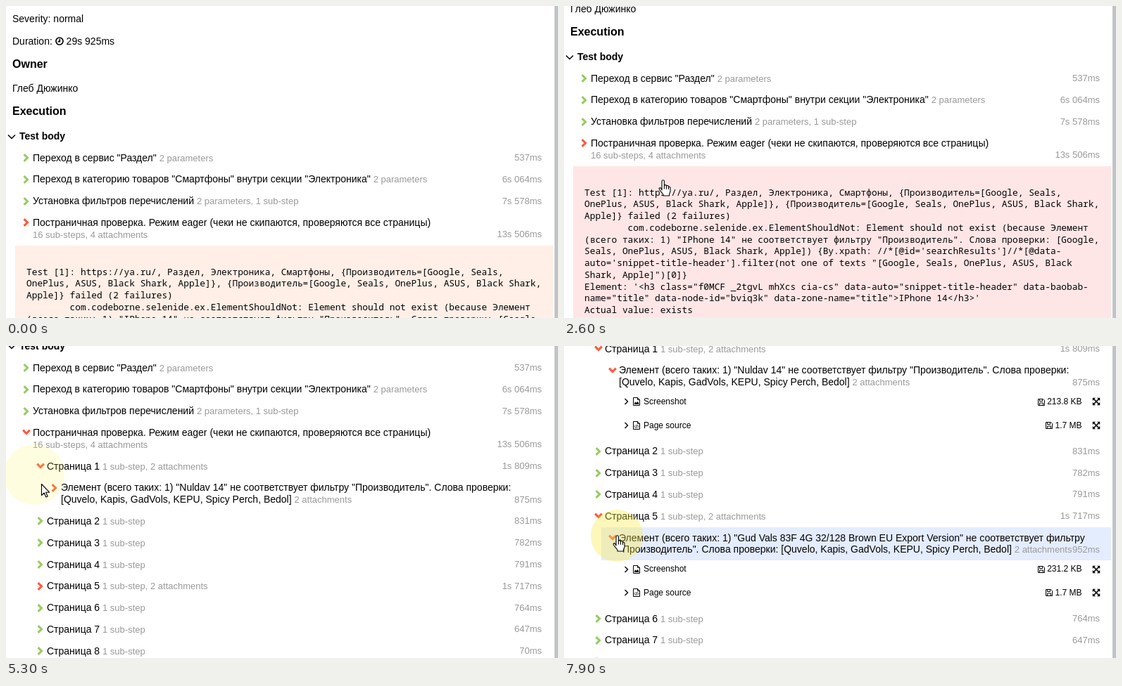
Recreate the animation shown at these times as an HTML page. Size 784 by 444 pixels, loop 8 s.

```html
<!DOCTYPE html>
<html lang="ru">
<head>
<meta charset="utf-8">
<title>Test report</title>
<style>
html, body { margin: 0; width: 100%; height: 100%; overflow: hidden; background: #fff; }
#stage { position: relative; width: 784px; height: 444px; overflow: hidden; background: #fff;
  font: 14px/16.8px "Liberation Sans", Arial, sans-serif; color: #000; white-space: pre; }
#page { position: absolute; left: 0; top: 0; width: 777px; }
#bar { position: absolute; left: 779px; top: 0; width: 5px; height: 100%; background: #c1c4c7; }
#page > p { position: absolute; left: 9px; margin: 0; }
#page > .head { font-size: 16px; font-weight: bold; }
#page > .body { left: 19px; font-weight: bold; }
#steps { position: absolute; left: 0; top: 200.6px; width: 777px; }
svg { overflow: visible; fill: none; stroke: #000; }
.row { position: relative; padding: 7px 0 7px 25px; }
.row.hover { background: #e4edfe; }
.row small { font-size: 13px; line-height: 1; color: #999; }
.row .time { position: absolute; right: 16px; bottom: 6.5px; line-height: 16.8px; }
.row svg { position: absolute; left: 10px; top: 9.4px; width: 12px; height: 12px; stroke: #97cc64; stroke-width: 3.1; }
.row.failed svg { stroke: #fd5a3e; }
.row.open svg { transform: rotate(90deg); }
.file { position: relative; height: 33.7px; font-size: 12px; }
.file > * { position: absolute; top: 4.1px; }
.file svg { top: 6.5px; width: 12px; height: 12px; }
.file .size { right: 41.5px; }
.file .size svg { position: absolute; left: -14px; top: 2.5px; }
#log { margin: 0 0 0 13px; padding: 29px 16px; font: 12.83px/16.75px "Noto Sans Mono", "DejaVu Sans Mono", monospace; }
#overlay { position: absolute; left: 0; top: 0; width: 784px; height: 444px; }
#overlay path { fill: #fff; stroke-width: 1.1; stroke-linejoin: round; }
</style>
</head>
<body>
<div id="stage">
  <div id="page">
    <p style="top:9.6px">Severity: normal</p>
    <p style="top:41.6px">Duration: <svg width="12" height="12" style="vertical-align:-1.5px" stroke-width="1.7"><circle cx="6" cy="6" r="5"/><path d="M6.3 2.8V6.6H3.6"/></svg> 29s 925ms</p>
    <p class="head" style="top:75px">Owner</p>
    <p style="top:108.6px">Глеб Дюжинко</p>
    <p class="head" style="top:142px">Execution</p>
    <p class="body" style="top:176.6px"><svg width="12" height="12" style="position:absolute;left:-17px;top:3px" stroke-width="1.5"><path d="M1 3.5 6 8.5 11 3.5"/></svg>Test body</p>
    <div id="steps"></div>
  </div>
  <div id="bar"></div>
  <svg id="overlay">
    <circle id="ripple" stroke="none"/>
    <g id="hand"><path d="M-1 14V1.5a1.7 1.7 0 0 1 3.4 0V8a1.5 1.5 0 0 1 3 .3v.5a1.5 1.5 0 0 1 3 .5v.6a1.4 1.4 0 0 1 2.6.8V15.5c0 2-1.5 3-1.5 5V22H1V20.5C0 18.5-3 16-4.7 12.8c-.8-1.6 1-2.8 2.2-1.6z"/><path d="M2.4 8v4.5M5.4 8.8v4M8.4 9.6v3.3"/></g>
    <path id="arrow" d="M.5.5V16.5L4.2 13l2.6 6 2.4-1-2.6-5.8h5z"/>
  </svg>
</div>
<script>
const $ = id => document.getElementById(id);
const brands = '[Quvelo, Kapis, GadVols, KEPU, Spicy Perch, Bedol]';

const icon = (body, style = '') => `<svg viewBox="0 0 12 12" style="${style}">${body}</svg>`;

const step = (level, title, info, time, failed, id = '') =>
  `<div class="row${failed ? ' failed' : ''}" id="${id}" style="margin-left:${level * 20 - 7}px">` +
  icon('<path d="M2.6 1.2 7.5 6 2.6 10.8"/>') +
  `${title}<small>${info}</small><small class="time">${time}</small></div>`;

const group = (id, content) => `<div id="${id}-kids" hidden>${content}</div>`;

const sheet = '<path d="M1.5.5H7.5L10.5 3.5V11.5H1.5zM7.5.5V3.5H10.5"/>';
const picture = sheet + '<path d="M3 10V8L4.5 6.5 6 8 7.5 6 9.2 8V10z" fill="#000" stroke="none"/>';
const source = sheet + '<path d="M4.6 5.5 3 7.5 4.6 9.5M7.4 5.5 9 7.5 7.4 9.5M6.5 5 5.5 10" stroke-width=".8"/>';
const floppy = '<path d="M1.5 1.5H8.5L10.5 3.5V10.5H1.5zM3.5 1.5V4.5H7.5V1.5M3.5 10.5V7H8.5V10.5"/>';
const expand = '<path d="M2 2 10 10M10 2 2 10" stroke-width="1.7"/><path d="M.8.8H5L.8 5zM11.2.8V5L7 .8zM.8 11.2V7L5 11.2zM11.2 11.2H7L11.2 7z" fill="#000" stroke="none"/>';

const file = (name, art, size) => '<div class="file">' +
  icon('<path d="M3.5 2 7.5 6 3.5 10" stroke-width="1.4"/>', 'left:83px') +
  icon(art, 'left:97px') + `<span style="left:113px">${name}</span>` +
  `<span class="size">${icon(floppy)}${size}</span>` + icon(expand, 'left:750px') + '</div>';

const files = size => file('Screenshot', picture, size) + file('Page source', source, '1.7 MB');

const pageStep = (n, time, id = '') =>
  step(2, `Страница ${n} `, id ? '1 sub-step, 2 attachments' : '1 sub-step', time, id, id);

const pages =
  pageStep(1, '1s 809ms', 'first') +
  group('first',
    step(3, `Элемент (всего таких: 1) "Nuldav 14" не соответствует фильтру "Производитель". Слова проверки:\n${brands} `,
      '2 attachments', '875ms', true, 'firstItem') + group('firstItem', files('213.8 KB'))) +
  pageStep(2, '831ms') + pageStep(3, '782ms') + pageStep(4, '791ms') +
  pageStep(5, '1s 717ms', 'fifth') +
  group('fifth',
    step(3, `Элемент (всего таких: 1) "Gud Vals 83F 4G 32/128 Brown EU Export Version" не соответствует фильтру\n"Производитель". Слова проверки: ${brands} `,
      '2 attachments', '952ms', true, 'fifthItem') + group('fifthItem', files('231.2 KB'))) +
  pageStep(6, '764ms') + pageStep(7, '647ms') + pageStep(8, '70ms');

const reports = 'file:/C:/Users/Guest/IdeaProjects/SelenideTestCase/build/reports/tests/1700518563184.0';
const log = `Test [1]: https://ya.ru/, Раздел, Электроника, Смартфоны, {Производитель=[Google, Seals,
OnePlus, ASUS, Black Shark, Apple]}, {Производитель=[Google, Seals, OnePlus, ASUS, Black Shark,
Apple]} failed (2 failures)
        com.codeborne.selenide.ex.ElementShouldNot: Element should not exist (because Элемент
(всего таких: 1) "IPhone 14" не соответствует фильтру "Производитель". Слова проверки: [Google,
Seals, OnePlus, ASUS, Black Shark, Apple]) {By.xpath: //*[@id='searchResults']//*[@data-
auto='snippet-title-header'].filter(not one of texts "[Google, Seals, OnePlus, ASUS, Black
Shark, Apple]")[0]}
Element: '&lt;h3 class="f0MCF _2tgvL mhXcs cia-cs" data-auto="snippet-title-header" data-baobab-
name="title" data-node-id="bviq3k" data-zone-name="title"&gt;IPhone 14&lt;/h3&gt;'
Actual value: exists
Screenshot:
${reports}.png
Page source:
${reports}.html
Timeout: 4 s.`;

$('steps').innerHTML =
  step(1, 'Переход в сервис "Раздел" ', '2 parameters', '537ms') +
  step(1, 'Переход в категорию товаров "Смартфоны" внутри секции "Электроника" ', '2 parameters', '6s 064ms') +
  step(1, 'Установка фильтров перечислений ', '2 parameters, 1 sub-step', '7s 578ms') +
  step(1, 'Постраничная проверка. Режим eager (чеки не скипаются, проверяются все страницы)\n',
    '16 sub-steps, 4 attachments', '13s 506ms', true, 'check') +
  group('check', pages) + `<div id="log">${log}</div>`;

const rows = [...document.querySelectorAll('.row')];

// Wheel notches: start time and resting offset
const notch = 330;
const scrolls = [[-263, 18], [1859, 185], [2450, 18], [3650, 185], [6147, 352]];
// Pointer path: time, x, y
const path = [[900, -20, 330], [1200, 112, 262], [1500, 112, 262], [1600, 140, 248],
  [2800, 140, 248], [3200, 35, 283], [3500, 35, 283], [3640, 113, 279.5], [4200, 113, 279.5],
  [4700, 40, 183], [5100, 40, 183], [5300, 50, 196], [5550, 72, 219], [6700, 72, 219],
  [7100, 62, 243], [7400, 62, 243], [7600, 75, 270]];
// Button releases: time and the step they unfold
const clicks = [[3450, 'check'], [5000, 'first'], [5750, 'firstItem'], [7200, 'fifth'], [7700, 'fifthItem']];

const ease = u => u * u * (3 - 2 * u);
const clamp = u => Math.min(1, Math.max(0, u));
const mix = (a, b, u) => a + (b - a) * u;

function scrollAt(t) {
  let now = -149, settled = now;
  for (const [start, to] of scrolls) {
    if (t < start) break;
    const u = clamp((t - start) / notch);
    settled = u < 1 ? now : to;
    now = mix(now, to, ease(u));
  }
  return { now: Math.round(now), settled };
}

function pointerAt(t) {
  const i = path.findIndex(k => k[0] > t);
  if (i === 0) return path[0].slice(1);
  if (i < 0) return path[path.length - 1].slice(1);
  const [a, b] = [path[i - 1], path[i]];
  const u = ease((t - a[0]) / (b[0] - a[0]));
  return [mix(a[1], b[1], u), mix(a[2], b[2], u)];
}

function draw(t) {
  for (const [time, id] of clicks) {
    const open = t >= time + 50;
    $(id).classList.toggle('open', open);
    $(id + '-kids').hidden = !open;
  }

  const { now, settled } = scrollAt(t);
  $('page').style.transform = `translateY(${-now}px)`;

  // Hover stays with its row until the scroll comes to rest
  const [x, y] = pointerAt(t);
  const docY = y + settled - 200.6;
  const hits = el => el.offsetParent && x >= el.offsetLeft &&
    docY >= el.offsetTop - .5 && docY < el.offsetTop + el.offsetHeight - .5;
  const hovered = x > 0 && rows.find(hits);
  rows.forEach(row => row.classList.toggle('hover', row === hovered));

  const hand = hovered || hits($('log'));
  for (const [id, on] of [['hand', hand], ['arrow', !hand]]) {
    $(id).setAttribute('visibility', on ? 'visible' : 'hidden');
    $(id).setAttribute('transform', `translate(${Math.round(x)} ${Math.round(y)})`);
  }

  const click = clicks.find(([time]) => t >= time - 100 && t < time + 400);
  const ripple = $('ripple');
  ripple.setAttribute('visibility', click ? 'visible' : 'hidden');
  if (click) {
    const p = clamp((t - click[0]) / 400);
    const [cx, cy] = pointerAt(click[0]);
    ripple.setAttribute('cx', cx);
    ripple.setAttribute('cy', cy);
    ripple.setAttribute('r', 25 + 24 * p);
    ripple.setAttribute('fill', `rgb(253 ${218 + 30 * p} 70)`);
    ripple.setAttribute('opacity', .8 * (1 - p) ** 1.1);
  }

  const rosy = (t >= 1800 && t < 2800) || (t >= 3700 && t < 5000);
  $('log').style.background = rosy ? '#ffe6e6' : '#ffefe6';
}

function tick() {
  draw(Math.floor(performance.now() % 8000 / 100) * 100);
  requestAnimationFrame(tick);
}
tick();
</script>
</body>
</html>
```
